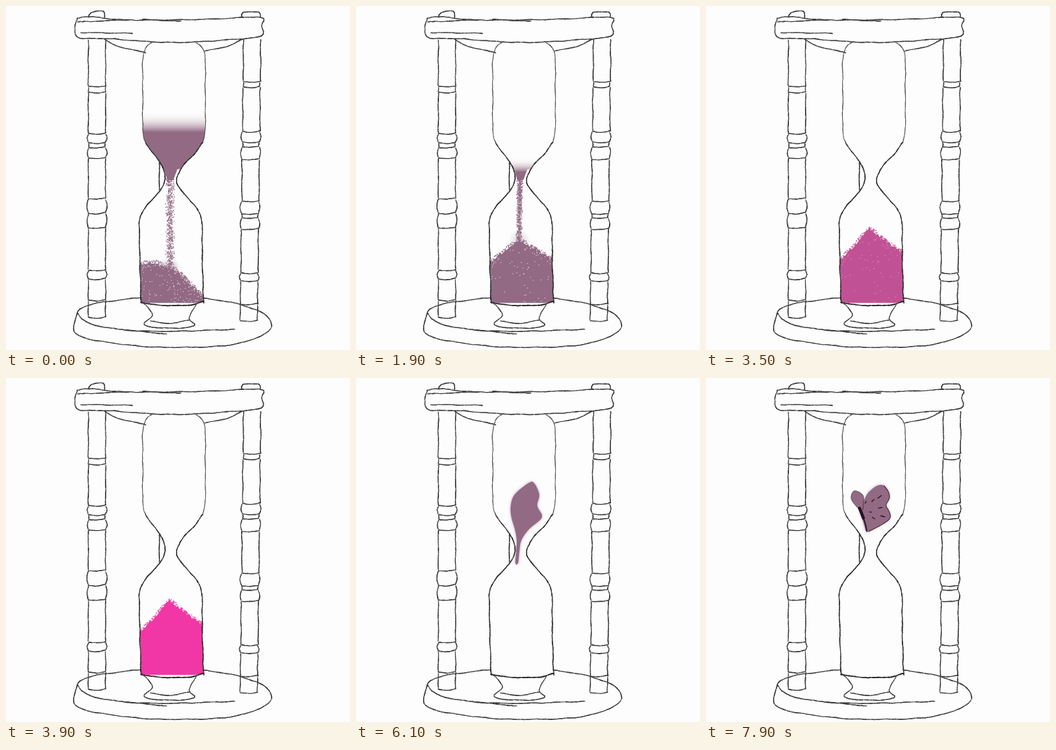
An HTML page with a canvas that plays this animation: 518x518 px, repeating every 8 s.

```html
<!DOCTYPE html>
<html>
<head>
<meta charset="utf-8">
<title>Hourglass</title>
<style>
html, body { margin: 0; width: 100%; height: 100%; overflow: hidden; background: #fdfdfd; }
canvas { display: block; }
</style>
</head>
<body>
<canvas id="stage" width="518" height="518"></canvas>
<script>
const SIZE = 518, LOOP = 8000, STEP = 100;
const SAND = [146, 106, 132], PINK = [240, 55, 165], PAPER = '#fdfdfd';
const ctx = document.getElementById('stage').getContext('2d');
const clamp = v => Math.max(0, Math.min(1, v));
const ramp = (t, a, b) => clamp((t - a) / (b - a));
const mix = (a, b, k) => a.map((v, i) => v + (b[i] - v) * k);
const rgba = (c, a = 1) => `rgba(${c.map(Math.round).join()},${a})`;

function random(seed) {
  let s = seed * 7919 + 1;
  return () => (s = s * 16807 % 2147483647) / 2147483647;
}

// keys: [[time, ...values], ...]
function track(keys, t) {
  const next = keys.findIndex(k => k[0] > t);
  if (next === 0) return keys[0].slice(1);
  if (next < 0) return keys[keys.length - 1].slice(1);
  const a = keys[next - 1], b = keys[next];
  return mix(a, b, ramp(t, a[0], b[0])).slice(1);
}

const pairs = flat => flat.flatMap((v, i) => i % 2 ? [] : [[v, flat[i + 1]]]);

// Catmull-Rom sampling through the points
function spline(pts, closed) {
  const n = pts.length, out = [];
  const at = i => closed ? pts[(i + n) % n] : pts[Math.max(0, Math.min(n - 1, i))];
  for (let i = 0; i < (closed ? n : n - 1); i++) {
    const [a, b, c, d] = [at(i - 1), at(i), at(i + 1), at(i + 2)];
    const steps = Math.max(2, Math.ceil(Math.hypot(c[0] - b[0], c[1] - b[1]) / 4));
    for (let s = 0; s < steps; s++) {
      const u = s / steps;
      out.push([0, 1].map(k => b[k] + u / 2 * (c[k] - a[k] + u * (2 * a[k] - 5 * b[k] + 4 * c[k] - d[k]
        + u * (3 * (b[k] - c[k]) + d[k] - a[k])))));
    }
  }
  if (!closed) out.push(pts[n - 1]);
  return out;
}

function trace(g, pts) {
  g.beginPath();
  pts.forEach(p => g.lineTo(...p));
}

// height and half width of the glass around a slightly leaning axis
const profile = pairs([55,33, 62,42, 80,47, 130,47, 186,47, 206,43, 222,31, 238,18, 250,11, 263,9,
  274,13, 289,26, 308,41, 325,47, 380,47, 447,47]);
const axis = y => 253 - 5 * ramp(y, 225, 260) + 2.5 * ramp(y, 360, 447);
const side = dir => profile.map(([y, half]) => [axis(y) + dir * half, y]);
const glass = [...spline(side(-1)), ...spline(side(1)).reverse()];

function drawFrame() {
  const sheet = document.createElement('canvas');
  sheet.width = sheet.height = SIZE;
  const g = sheet.getContext('2d'), rnd = random(7);
  g.lineCap = 'round';
  function inkPoints(points, weight = 1.5, tone = 45) {
    const phase = rnd() * 9;
    const pts = spline(points).map(([x, y], i) => [
      x + Math.sin(i * 0.7 + phase) * 0.35 + (rnd() - 0.5) / 2,
      y + Math.cos(i * 0.6 + phase) * 0.35 + (rnd() - 0.5) / 2]);
    for (let i = 1; i < pts.length; i++) {
      const shade = tone + rnd() * 35;
      g.strokeStyle = rgba([shade, shade, shade]);
      g.lineWidth = weight * (0.75 + rnd() * 0.45);
      trace(g, [pts[i - 1], pts[i]]);
      g.stroke();
    }
  }
  const ink = (...flat) => inkPoints(pairs(flat));

  // turned post: short sections are rings, the shortest are grooves
  function post(middle, heights) {
    for (let i = 1; i < heights.length; i++) {
      const top = heights[i - 1], bottom = heights[i], tall = bottom - top, x = middle(top);
      const half = tall < 9 ? 12 : 13, bulge = tall > 9 && tall < 24 ? 2 : 0;
      for (const dir of [-1, 1]) {
        const edge = x + dir * half;
        ink(edge, top + 1, edge + dir * bulge, top + tall / 2, edge, bottom - 1);
      }
      ink(x - half, bottom, x, bottom + 1, x + half, bottom - 1);
    }
  }

  // lid
  ink(107,19, 125,16, 185,21, 300,20, 382,17, 385,30, 384,45, 345,50, 250,55, 150,49, 110,48, 104,32, 107,19);
  ink(107,24, 185,21);
  ink(205,20, 263,23);
  ink(113,40, 190,41);
  ink(124,16, 128,10, 147,8, 148,17);
  ink(355,17, 357,10, 380,9, 383,17);
  ink(148,50, 170,61, 210,70);
  ink(299,68, 335,60, 356,50);

  post(() => 137, [50, 121, 130, 192, 206, 213, 229, 290, 312, 334, 398, 411, 443, 469]);
  post(y => 371 - y * 0.012, [50, 114, 122, 189, 205, 212, 231, 294, 313, 319, 336, 402, 414, 449, 474]);

  // base
  ink(202,439, 125,450, 106,467, 109,496, 180,510, 250,514, 340,510, 395,490, 393,467, 351,449, 298,440);
  ink(108,462, 118,474, 150,484, 242,494);
  ink(180,488, 240,490, 344,487);

  // glass and its foot
  for (const dir of [-1, 1]) {
    const line = side(dir);
    inkPoints(line.slice(0, 6), 1.2, 65);
    inkPoints(line.slice(5), 1.6, 30);
  }
  ink(231,236, 231,277);
  inkPoints(pairs([203,446, 225,450, 270,451, 298,445]), 1.8, 25);
  ink(204,446, 214,454, 220,466, 208,479, 225,484, 260,485, 284,481, 276,470, 286,450);
  ink(217,474, 245,478, 276,473);
  return sheet;
}
const frame = drawFrame();

const dot = (x, y, r) => ctx.fillRect(x - r / 2, y - r / 2, r, r);

function inGlass(paint) {
  ctx.save();
  trace(ctx, glass);
  ctx.clip();
  paint();
  ctx.restore();
}

// time, fuzzy top, solid level
const levels = [[0, 158, 190], [1000, 190, 232], [1900, 228, 250], [2800, 262, 276]];

function drawUpperSand(t) {
  if (t >= 2800) return;
  const [fuzz, solid] = track(levels, t);
  inGlass(() => {
    const fade = ctx.createLinearGradient(0, fuzz, 0, solid);
    for (let p = 0; p <= 1; p += 0.125) fade.addColorStop(p, rgba(SAND, p ** 2.3));
    ctx.fillStyle = fade;
    trace(ctx, [[200, fuzz], [305, fuzz], [305, 236], [258, 246], [252, 262], [243, 262], [238, 246], [200, 236]]);
    ctx.fill();
  });
}

const surfaceX = [202, 225, 245, 260, 277, 297];
const surface = [
  [0, 388, 386, 394, 399, 417, 438],
  [1000, 388, 374, 367, 372, 379, 393],
  [3000, 382, 359, 334, 345, 359, 373]];

function drawStream(t, apex) {
  const strength = 1 - ramp(t, 2200, 2900), settle = ramp(t, 0, 1000);
  if (!strength) return;
  const rnd = random(t + 11);
  ctx.fillStyle = rgba(SAND);
  for (let i = 0; i < 620 * strength; i++) {
    const y = 256 + rnd() * (apex - 256);
    dot(247 - 2 * settle * ramp(y, 260, 370) + (rnd() + rnd() - 1) * (7 - 2 * settle), y, 1.3);
  }
  const puff = ctx.createRadialGradient(246, apex, 0, 246, apex, 16);
  puff.addColorStop(0, rgba(SAND, 0.55 * (1 - ramp(t, 1200, 2800))));
  puff.addColorStop(1, rgba(SAND, 0));
  ctx.fillStyle = puff;
  dot(246, apex, 36);
}

function drawPile(t, pink) {
  const ys = track(surface, t), rnd = random(5);
  const height = x => {
    const i = Math.max(1, surfaceX.findIndex(v => v >= x));
    return ys[i - 1] + (ys[i] - ys[i - 1]) * ramp(x, surfaceX[i - 1], surfaceX[i]);
  };
  drawStream(t, height(246));
  inGlass(() => {
    ctx.fillStyle = rgba(mix(SAND, PINK, pink));
    const edge = [];
    for (let x = 202; x <= 297; x += 1.5) edge.push([x, height(x) + (rnd() - 0.5) * 4]);
    trace(ctx, [...edge, [297, 446], [250, 450], [203, 446]]);
    ctx.fill();
    for (let i = 0; i < 90; i++) {
      const x = 203 + rnd() * 92;
      dot(x, height(x) - rnd() * 4, 1.4);
    }
    ctx.fillStyle = `rgba(253,253,253,${0.75 * (1 - pink)})`;
    for (let i = 0; i < 150 - 75 * ramp(t, 0, 1000); i++) {
      const x = 204 + rnd() * 91, h = height(x), depth = rnd() * (i % 3 ? 1 : 0.12);
      dot(x, h + depth * (446 - h), 1.2);
    }
  });
}

// time, top, bottom, then left and right edges at even heights
const blobs = [
  [4000, 335,449, 246,249, 231,265, 216,288, 202,296, 202,296, 202,296, 202,297, 206,296],
  [4700, 291,434, 244,250, 240,259, 233,262, 210,266, 201,281, 202,287, 213,286, 242,266],
  [5000, 264,413, 245,250, 241,256, 240,259, 234,262, 221,268, 213,273, 217,273, 241,254],
  [5400, 195,365, 244,254, 234,268, 240,258, 243,254, 240,255, 237,258, 238,257, 245,252],
  [6100, 158,279, 260,268, 239,276, 233,273, 234,280, 239,261, 242,249, 241,246, 240,244],
  [6700, 162,231, 258,268, 245,275, 239,276, 235,271, 232,276, 235,277, 238,264, 241,245]];

function blobEdges(t) {
  const [top, bottom, ...edges] = track(blobs, t), rows = pairs(edges);
  const y = i => top + (bottom - top) * i / (rows.length - 1);
  return [0, 1].map(k => rows.map((row, i) => [row[k], y(i)]));
}

function drawBlob(t, pink) {
  const [left, right] = blobEdges(t), color = mix(SAND, PINK, pink);
  ctx.save();
  ctx.fillStyle = rgba(color);
  ctx.shadowColor = rgba(color, 0.6);
  ctx.shadowBlur = 4;
  trace(ctx, spline([...right, ...left.reverse()], true));
  ctx.fill();
  ctx.restore();
  if (t >= 5000) return;
  const rnd = random(23);
  ctx.fillStyle = `rgba(253,253,253,${0.7 * (1 - pink)})`;
  for (let i = 0; i < 14; i++) dot(232 + rnd() * 42, 380 + rnd() * 36, 1.2);
}

function stroke(points, weight, alpha = 1) {
  ctx.strokeStyle = `rgba(35,22,32,${alpha})`;
  ctx.lineWidth = weight;
  ctx.lineCap = 'round';
  trace(ctx, spline(points));
  ctx.stroke();
}

const heart = [234, 200];
const wing = pairs([234,200, 219,183, 223,170, 236,176, 237,190]);
const marks = pairs([253,183, 264,177, 241,186, 265,195, 269,209, 254,212, 249,202]);

function drawButterfly(t) {
  const grow = ramp(t, 6700, 7100);
  if (!grow) return;
  const leftWing = spline(wing.map(p => mix(heart, p, grow)), true);
  ctx.fillStyle = rgba(SAND);
  trace(ctx, leftWing);
  ctx.fill();
  stroke(leftWing, 1, 0.6);

  const body = ramp(t, 7000, 7200);
  stroke(pairs([231,196, 234,203, 237,211]), 4.5, body);
  stroke(pairs([236,208, 240,220, 242,230]), 1.8, body);
  stroke(blobEdges(t)[1], 1.1, 0.8 * ramp(t, 7100, 7400));
  marks.slice(0, Math.round(marks.length * ramp(t, 7200, 7600)))
    .forEach(p => stroke([p, mix(p, heart, 0.17)], 1.4));
}

function render(t) {
  const pink = ramp(t, 3200, 3800) * (1 - ramp(t, 4000, 4300));
  ctx.fillStyle = PAPER;
  ctx.fillRect(0, 0, SIZE, SIZE);
  drawUpperSand(t);
  if (t <= 4000) drawPile(t, pink);
  else drawBlob(t, pink);
  drawButterfly(t);
  ctx.drawImage(frame, 0, 0);
}

function tick(now) {
  render(Math.floor(now % LOOP / STEP) * STEP);
  requestAnimationFrame(tick);
}
render(0);
requestAnimationFrame(tick);
</script>
</body>
</html>
```
